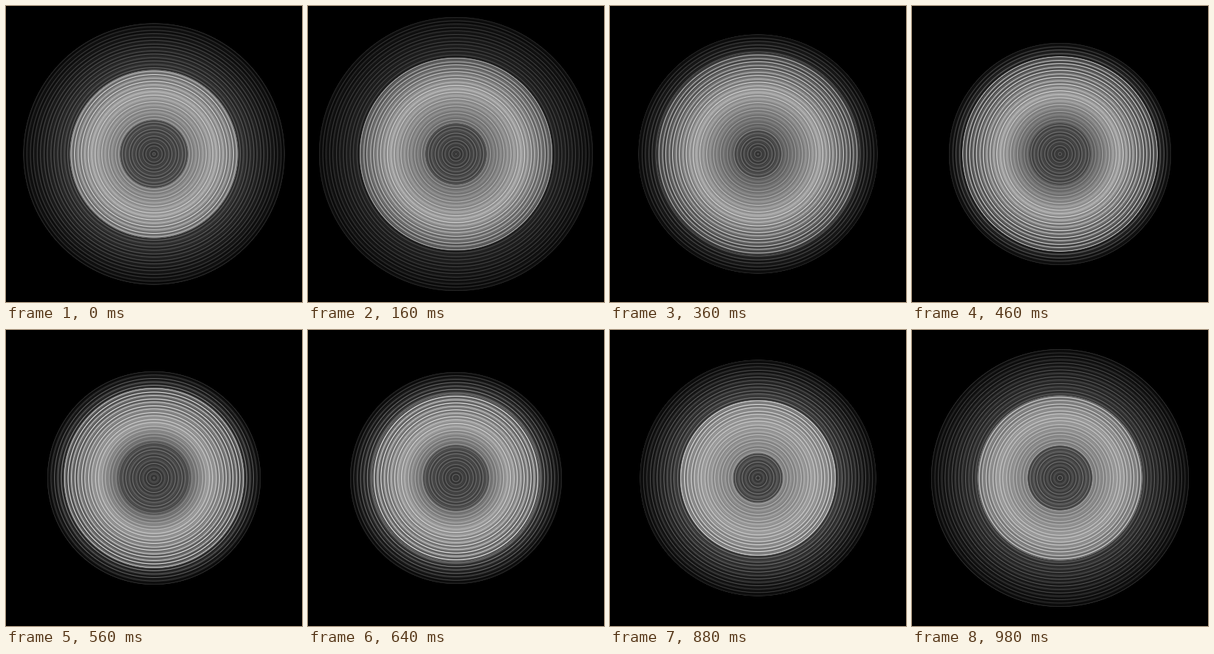
Animation, 400 px wide and 400 px high, one loop 1 s. Source, as an HTML page with a canvas:

```html
<!DOCTYPE html>
<html lang="en">
<head>
<meta charset="utf-8">
<title>Pulsing rings</title>
<style>
  html, body { margin: 0; width: 100%; height: 100%; overflow: hidden; background: #000; }
  canvas { display: block; width: 100vmin; height: 100vmin; margin: auto; }
</style>
</head>
<body>
<canvas id="stage" width="400" height="400"></canvas>
<script>
const ctx = document.getElementById('stage').getContext('2d');
const LOOP = 1000, STEP = 20, CENTER = 200, MAX_R = 190;

const clamp = x => Math.max(0, Math.min(1, x));
const mix = (a, b, u) => a + (b - a) * u;

// One swing per loop, highest at the given phase
const swing = (p, mean, reach, peak) => mean + reach * Math.cos(2 * Math.PI * (p - peak));

// Edges of the ring bands and the mean gray on each side of them
function pose(p) {
  return {
    rim: swing(p, 161.5, 21.3, 0.127) + swing(2 * p, 0, 2.5, 0.254),
    outer: swing(p, 121, 17, 0.32),
    crest: swing(p, 80, 9, 0.2),
    inner: swing(2 * p, 39, 9, 0.12),
    outside: swing(p, 60, 20, 0.75),
    inside: swing(p, 115, 27, 0.83),
    hollow: swing(p, 115, 18, 0.9)
  };
}

// Mean gray at a radius
function tone(r, s) {
  if (r > s.outer) return mix(s.outside, 18, clamp((r - s.outer) / (s.rim - s.outer)));
  if (r > s.crest) return mix(164, s.inside, (r - s.crest) / (s.outer - s.crest));
  if (r > s.inner) return mix(s.hollow, 164, (r - s.inner) / (s.crest - s.inner));
  return mix(62, 84, r / s.inner);
}

// Thin lines at a regular spacing, with a mean of one
function comb(distance, gap) {
  const width = 0.65;
  const x = distance - gap * Math.round(distance / gap);
  return Math.exp(-((x / width) ** 2)) * gap / (width * Math.sqrt(Math.PI));
}

function gray(r, s) {
  if (r > s.rim + 0.5) return 0;
  const far = clamp((r - s.crest) / (s.rim - s.crest));
  const near = clamp((s.inner - r) / 12 + 0.5);
  const lines = mix(comb(s.rim - r, 4.6), comb(r - s.outer, 3.1), mix(0.4, 0.25, far));
  const solid = mix(0.88, 0.4, far) - 0.12 * near;
  return Math.min(220, tone(r, s) * mix(lines, 1, solid));
}

function draw(t) {
  const s = pose(t / LOOP);
  const fill = ctx.createRadialGradient(CENTER, CENTER, 0, CENTER, CENTER, MAX_R);
  for (let r = 0; r <= MAX_R; r += 0.5) {
    const g = Math.round(gray(r, s));
    fill.addColorStop(r / MAX_R, `rgb(${g},${g},${g})`);
  }
  ctx.fillStyle = '#000';
  ctx.fillRect(0, 0, 400, 400);
  ctx.fillStyle = fill;
  ctx.beginPath();
  ctx.arc(CENTER, CENTER, MAX_R, 0, Math.PI * 2);
  ctx.fill();
}

const start = performance.now();
function tick() {
  const t = (performance.now() - start) % LOOP;
  draw(Math.floor(t / STEP) * STEP);
  requestAnimationFrame(tick);
}
tick();
</script>
</body>
</html>
```
